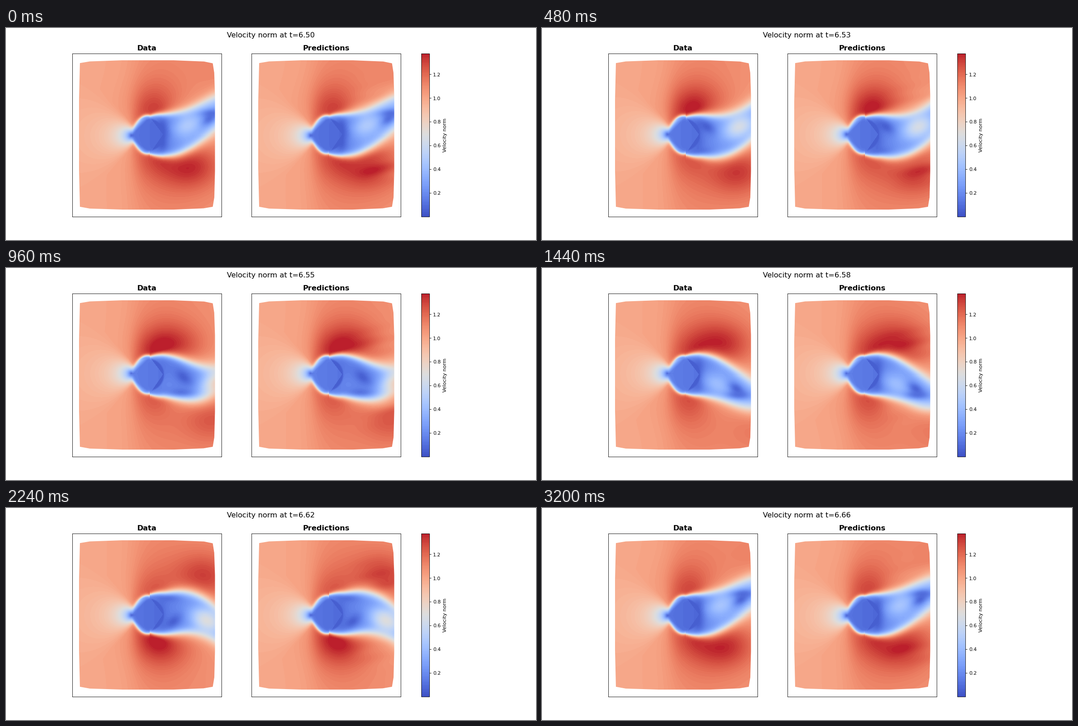
Write a matplotlib script that moves like this. It is 1183x473 px and loops after 3.36 s.

```python
import numpy as np
import matplotlib.pyplot as plt
from matplotlib.animation import FuncAnimation
from matplotlib.cm import ScalarMappable
from matplotlib.colors import ListedColormap, Normalize
from matplotlib.patches import Polygon

DPI = 78.87              # 15 x 6 inches -> 1183 x 473 pixels
FRAMES, STEP_MS = 21, 160
PERIOD = 20.6            # frames per shedding cycle
VMAX = 1.377
AXIS = 238.5             # wake axis, pixels from the top
CX, RADIUS = 316, 36     # cylinder

plt.rcParams["font.family"] = "DejaVu Sans"
cmap = ListedColormap(plt.get_cmap("coolwarm")(np.linspace(0.015, 0.975, 100)))
norm = Normalize(0, VMAX)

xs = np.arange(163, 467) + 0.5
ys = np.arange(72, 406) + 0.5
X, Y = np.meshgrid(xs, ys)
UP = AXIS - Y
R = np.hypot(X - CX, UP)


def sig(z):
    return 1 / (1 + np.exp(-np.clip(z, -40, 40)))


def cosd(deg):
    return np.cos(np.radians(deg))


def swell(age, start, end):
    """Rises from 0 to 1 and falls back over a feature's life."""
    return np.sin(np.pi * np.clip((age - start) / (end - start), 0, 1))


def blob(up, x, h, sx, sy, slant=0.0):
    dx, dy = X - x, up - h
    return np.exp(-0.5 * (((dx - slant * dy) / sx) ** 2 + (dy / sy) ** 2))


# Travelling features of the upper side; age is in degrees of the cycle.
def lobe(age, up):
    amp = 0.31 * swell(age, -60, 400) ** 1.5
    return amp * blob(up, 330 + 0.45 * age, 58 + 0.001 * (age - 90) ** 2, 48, 39)


def lens(age, up):
    drop = 0.0065 * max(age - 30, 0) ** 2
    grow = 0.06 * max(age, 0)
    amp = min(1, 1.4 * swell(age, -100, 170))
    shape = blob(up, 405 + 0.65 * age, 20 - drop, 20 + grow, 16 + grow, 0.4)
    return amp * shape, 0.48 + 0.0032 * age


def core(age, up):
    amp = min(0.95, 1.5 * swell(age, -30, 230))
    x = 347 + 0.27 * age + 0.0018 * age ** 2
    return amp * blob(up, x, -8 + 27 * cosd(1.286 * (age - 40)), 11, 11, -0.5), 0.045


def strip(age, up):
    amp = min(0.95, 1.3 * swell(age, 20, 225))
    x = 325 + 0.45 * age + 0.0016 * age ** 2
    return amp * blob(up, x, -34 - 0.075 * age, 19, 7), 0.045


def both_sides(feature, phase):
    """Live copies of a feature, and their mirror half a cycle later."""
    for ph, up in ((phase % 360, UP), ((phase + 180) % 360, -UP)):
        for age in (ph - 360, ph, ph + 360):
            if -100 < age < 400:
                yield feature(age, up)


def edge(phase):
    """Height of the wake's upper edge: a wave that grows downstream."""
    s = np.clip((xs - 350) / 116, 0, 1)
    neck = 4 * np.clip((350 - xs) / 28, 0, 1) ** 2
    lag = 110 * (1 - s ** 0.7)
    return (46.5 - 14.5 * s ** 2 - neck
            + (2.5 + 45 * s ** 1.6) * cosd(phase + lag)
            + 8 * s ** 2 * cosd(2 * (phase - 30)))


def beyond(x0, y0, x1, y1):
    """Distance outside a chord of the cylinder, taken clockwise."""
    n = np.hypot(x1 - x0, y1 - y0)
    return np.maximum(0, ((X - x0) * (y1 - y0) - (Y - y0) * (x1 - x0)) / n)


UPPER_FRONT = beyond(281, 240, 321, 201)
LOWER_FRONT = beyond(322, 277, 282, 246)
REAR = beyond(321, 201, 349, 238) + beyond(349, 238, 322, 277)
BODY = sig((35.5 - R) / 0.8)
SIN2 = (UP / np.maximum(R, 1)) ** 2
FRONT = sig((34.5 + 7.5 * SIN2 ** 3 - R) / 2.1)
THICK = 2.2 + 7.3 * np.clip((X - 322) / 144, 0, 1)

rng = np.random.default_rng(4)
WAVES = [(rng.uniform(.02, .07), rng.uniform(.06, .2), rng.uniform(0, 6.28))
         for _ in range(7)]
ROUGH = sig((X - 378) / 12) * np.exp(-((np.abs(UP) - 75) / 34) ** 2)


def outer_flow(phase):
    # potential flow round a cylinder, its overspeed softened
    shift = 3 * cosd(phase - 310) * sig((300 - X) / 12)
    dx, dy = X - CX, UP + shift
    r2 = np.maximum(dx ** 2 + dy ** 2, 1)
    q = RADIUS ** 2 / np.maximum(r2, RADIUS ** 2)
    cos2 = (dx ** 2 - dy ** 2) / r2
    excess = np.sqrt(np.maximum(1 - 2 * q * cos2 + q ** 2, 0)) - 1
    over = 0.19 * np.tanh(np.maximum(excess, 0) / 0.19) * sig((X - 284) / 12)
    u = 1 + over + np.minimum(excess, 0) + 0.08 * sig((X - 300) / 28)
    return u + sum(both_sides(lobe, phase))


def wake_flow(phase):
    c2 = cosd(2 * phase - 10)
    v = 0.15 + (0.07 + 0.07 * c2) * np.clip((X - 350) / 50, 0, 1)
    near = np.exp(-((X - 347) / 13) ** 2 - (UP / 36) ** 4)
    v += (0.035 - v) * near * (0.6 + 0.4 * c2)
    for feature in (lens, core, strip):
        for weight, speed in both_sides(feature, phase):
            v += (speed - v) * weight
    body = 0.115 - 0.025 * cosd(phase - 310) - 0.0006 * (X - CX)
    body = body + 0.019 * UPPER_FRONT + 0.013 * LOWER_FRONT
    body = np.where(REAR > 0, 0.045, body)
    return v + (body - v) * BODY


def field(k, rough=0.0):
    phase = 360 * k / PERIOD
    wake = (sig((edge(phase) - UP) / THICK)
            * sig((edge(phase + 180) + UP) / THICK))
    inside = np.where(X < 320, FRONT, wake)
    noise = sum(np.sin(a * (X - 8 * k) + b * Y + p) for a, b, p in WAVES)
    outer = outer_flow(phase) + rough * ROUGH * noise
    return np.clip(outer + (wake_flow(phase) - outer) * inside, 0, VMAX)


OUTLINE = [(165, 78.5), (187, 74.8), (258, 72.3), (374, 72.3), (442, 75),
           (461.5, 79), (464.8, 100), (466.5, 150), (466.5, 320), (465, 378),
           (461.5, 399), (441, 402.5), (374, 405.3), (260, 405.3),
           (187, 403), (165, 399), (162.8, 307), (162.8, 170)]

fig, axes = plt.subplots(1, 2, figsize=(15, 6), dpi=DPI, facecolor="white")


def panel(ax, name):
    img = ax.imshow(np.zeros_like(X), cmap=cmap, norm=norm, aspect="auto",
                    extent=(163, 467, 406, 72), interpolation="nearest")
    ax.set(xlim=(147.9, 481.3), ylim=(421.1, 56.8), xticks=[], yticks=[])
    ax.set_title(name, fontsize=15, fontweight="bold")
    img.set_clip_path(Polygon(OUTLINE, transform=ax.transData))
    return img


data = panel(axes[0], "Data")
pred = panel(axes[1], "Predictions")
fig.colorbar(ScalarMappable(norm, cmap), ax=axes, label="Velocity norm",
             ticks=np.arange(0.2, 1.3, 0.2), format="%.1f")
title = fig.suptitle("", fontsize=15)


def update(k):
    data.set_data(field(k))
    pred.set_data(field(k, rough=0.008))
    title.set_text(f"Velocity norm at t={6.504 + 0.008 * k:.2f}")
    return data, pred, title


anim = FuncAnimation(fig, update, frames=FRAMES, interval=STEP_MS, repeat=True,
                     repeat_delay=0, blit=False)
plt.show()
```
